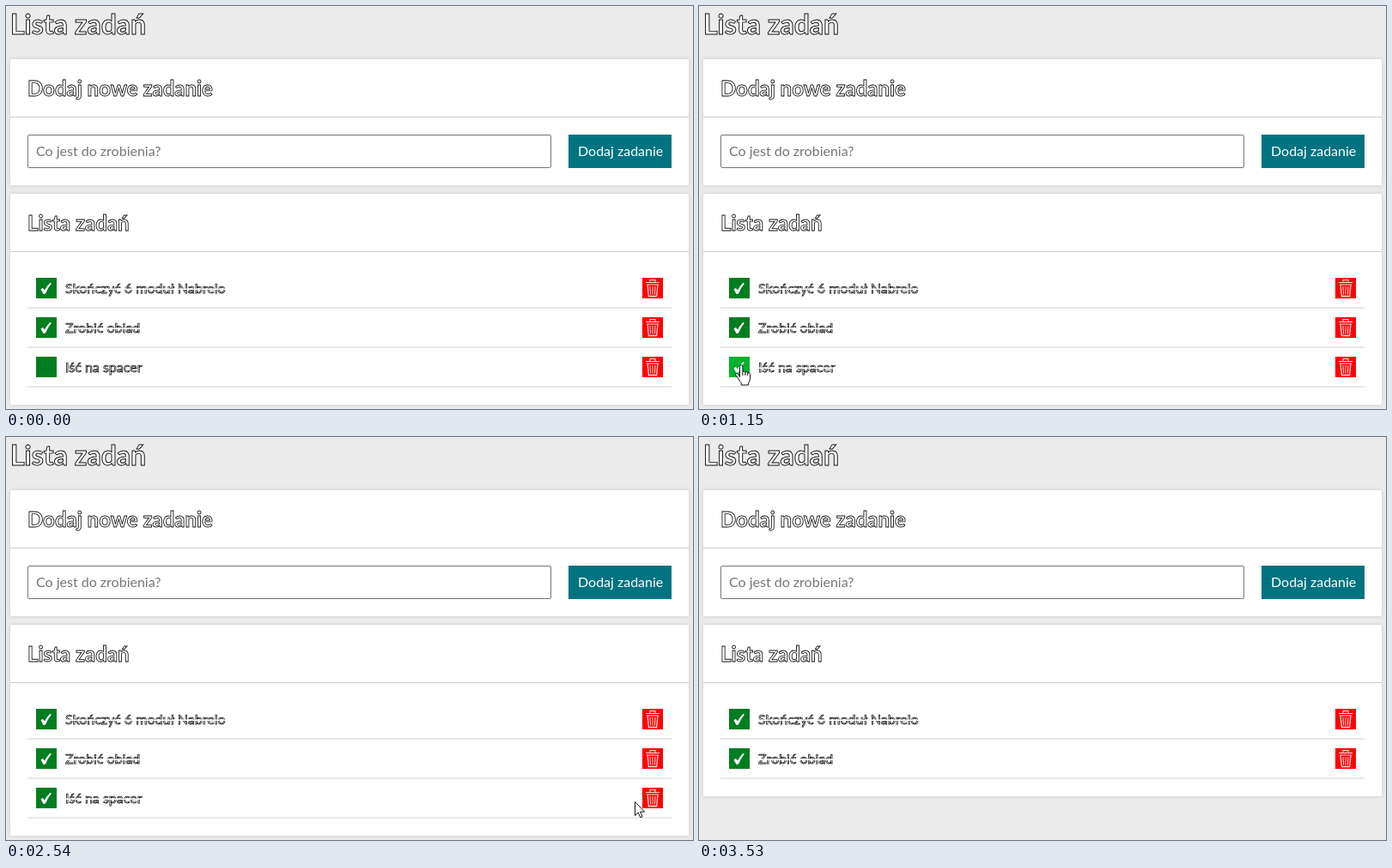
Animation, 800 px wide and 470 px high, one loop 4.12 s. Source, as an HTML page:

```html
<!DOCTYPE html>
<html lang="pl">
<head>
<meta charset="utf-8">
<title>Lista zadań</title>
<style>
  html, body { margin: 0; width: 100%; height: 100%; overflow: hidden; background: #ebebeb; }
  svg { display: block; width: 800px; height: 470px; font: 16px Lato, sans-serif; }

  .card { fill: #fff; filter: drop-shadow(0 0 2px #c8c8c8); }
  .rule { fill: #ccc; }
  .line { fill: #e9e9e9; }
  .hollow { fill: #fff; stroke: #111; stroke-width: .75px; }
  .title { font-size: 32px; font-weight: 700; stroke-width: .95px; }
  .heading { font-size: 24px; font-weight: 700; stroke-width: .85px; }
  .strike { fill: #fff; }
  .box { fill: #007d1f; }
  .bin { fill: #f00; }

  .list, .last, .last .box, .last .bin, .last .done, .cursor, .arrow, .hand {
    animation: 4120ms step-end infinite;
  }
  .list { animation-name: shrink; }
  .last { animation-name: remove; }
  .last .box { animation-name: hover-box; }
  .last .bin { animation-name: hover-bin; }
  .last .done { animation-name: check; }
  .cursor { animation-name: move; }
  .arrow { animation-name: arrow; }
  .hand { animation-name: hand; }

  @keyframes shrink { 0% { height: 246px } 71.117%, 100% { height: 200px } }
  @keyframes remove { 0% { visibility: visible } 71.117%, 100% { visibility: hidden } }
  @keyframes check { 0% { opacity: 0 } 27.913%, 100% { opacity: 1 } }
  @keyframes hover-box {
    0%, 37.379%, 100% { fill: #007d1f }
    13.107% { fill: #00b22d }
  }
  @keyframes hover-bin {
    0%, 71.117%, 100% { fill: #f00 }
    63.107% { fill: #f33 }
  }
  @keyframes arrow {
    0%, 13.107%, 63.107%, 85.68%, 100% { opacity: 0 }
    6.553%, 37.379%, 71.117% { opacity: 1 }
  }
  @keyframes hand {
    0%, 37.379%, 71.117%, 100% { opacity: 0 }
    13.107%, 63.107% { opacity: 1 }
  }
  @keyframes move {
    0% { transform: translate(61px, 464px) }
    6.553% { transform: translate(61px, 464px); animation-timing-function: steps(4) }
    13.107% { transform: translate(49px, 426px); animation-timing-function: steps(3) }
    17.961% { transform: translate(49px, 419px) }
    35.752% { transform: translate(49px, 419px); animation-timing-function: steps(4) }
    42.233% { transform: translate(150px, 420px); animation-timing-function: steps(5) }
    50.243% { transform: translate(471px, 421px); animation-timing-function: steps(7) }
    61.65% { transform: translate(732px, 425px); animation-timing-function: steps(3) }
    66.383% { transform: translate(747px, 422px) }
    80.655% { transform: translate(747px, 422px); animation-timing-function: steps(3) }
    85.68%, 100% { transform: translate(786px, 472px) }
  }
</style>
</head>
<body>
<svg viewBox="0 0 800 470">
  <defs>
    <path id="tick" d="M40.5 330.5l2.3-1.8 2.1 2.8q2.8-5.2 6.3-8.5l1.8.4q-4.5 5.6-7.1 12.1l-2.3.4z" fill="#fff"/>
    <g id="trash" fill="none" stroke="#ffdada">
      <path d="M745 322.5h16M750 322v-2.5h6v2.5M746 325h14" stroke-width="1.2"/>
      <path d="M747 325l1.4 13.5h9.2l1.4-13.5" stroke-width="1.3"/>
      <path d="M750 327l.6 9.5M753 327v9.5M756 327l-.6 9.5"/>
    </g>
  </defs>

  <text class="hollow title" x="5" y="33">Lista zadań</text>

  <rect class="card" x="5" y="62" width="790" height="147"/>
  <text class="hollow heading" x="25" y="104.5">Dodaj nowe zadanie</text>
  <rect class="rule" x="5" y="129" width="790" height="1"/>
  <rect x="25.5" y="150.5" width="609" height="38" rx="1.5" fill="#fff" stroke="#767676"/>
  <text x="35" y="175" fill="#757575">Co jest do zrobienia?</text>
  <rect x="655" y="150" width="120" height="39" fill="#007380"/>
  <text x="666" y="175" fill="#fff">Dodaj zadanie</text>

  <rect class="card list" x="5" y="219" width="790" height="246"/>
  <text class="hollow heading" x="25" y="261.5">Lista zadań</text>
  <rect class="rule" x="5" y="286" width="790" height="1"/>

  <g>
    <rect class="box" x="35" y="317" width="24" height="24"/>
    <text class="hollow" x="69" y="335">Skończyć 6 moduł Nabrelo</text>
    <g class="done"><use href="#tick"/><rect class="strike" x="68" y="329.5" width="194" height="1.5"/></g>
    <rect class="bin" x="741" y="317" width="24" height="24"/>
    <use href="#trash"/>
    <rect class="line" x="25" y="351" width="750" height="2"/>
  </g>
  <g transform="translate(0 46)">
    <rect class="box" x="35" y="317" width="24" height="24"/>
    <text class="hollow" x="69" y="335">Zrobić obiad</text>
    <g class="done"><use href="#tick"/><rect class="strike" x="68" y="329.5" width="90" height="1.5"/></g>
    <rect class="bin" x="741" y="317" width="24" height="24"/>
    <use href="#trash"/>
    <rect class="line" x="25" y="351" width="750" height="2"/>
  </g>
  <g class="last" transform="translate(0 92)">
    <rect class="box" x="35" y="317" width="24" height="24"/>
    <text class="hollow" x="69" y="335">Iść na spacer</text>
    <g class="done"><use href="#tick"/><rect class="strike" x="68" y="329.5" width="91" height="1.5"/></g>
    <rect class="bin" x="741" y="317" width="24" height="24"/>
    <use href="#trash"/>
    <rect class="line" x="25" y="351" width="750" height="2"/>
  </g>

  <g class="cursor" fill="#fff" stroke="#111" stroke-linejoin="round">
    <path class="arrow" d="M.5.5v16l3.7-3.5 2.6 5.7 2.3-1-2.5-5.6h5z"/>
    <path class="hand" d="M-1.5 13.5V1.5q0-2 1.7-2t1.7 2v6q1.5-1.2 3 .5 1.6-1 2.8.7 2.6-.7 2.8 2v4.8q0 2.6-1.8 4.5v3h-8.5v-2.5q-2.2-2-3.6-5.3l-2.7-3.6q-.7-1.7.8-2.2 1.8-.1 3.8 4.1zM1.9 7.5v4.5M4.9 8v4M7.7 8.7v3.5"/>
  </g>
</svg>
</body>
</html>
```
